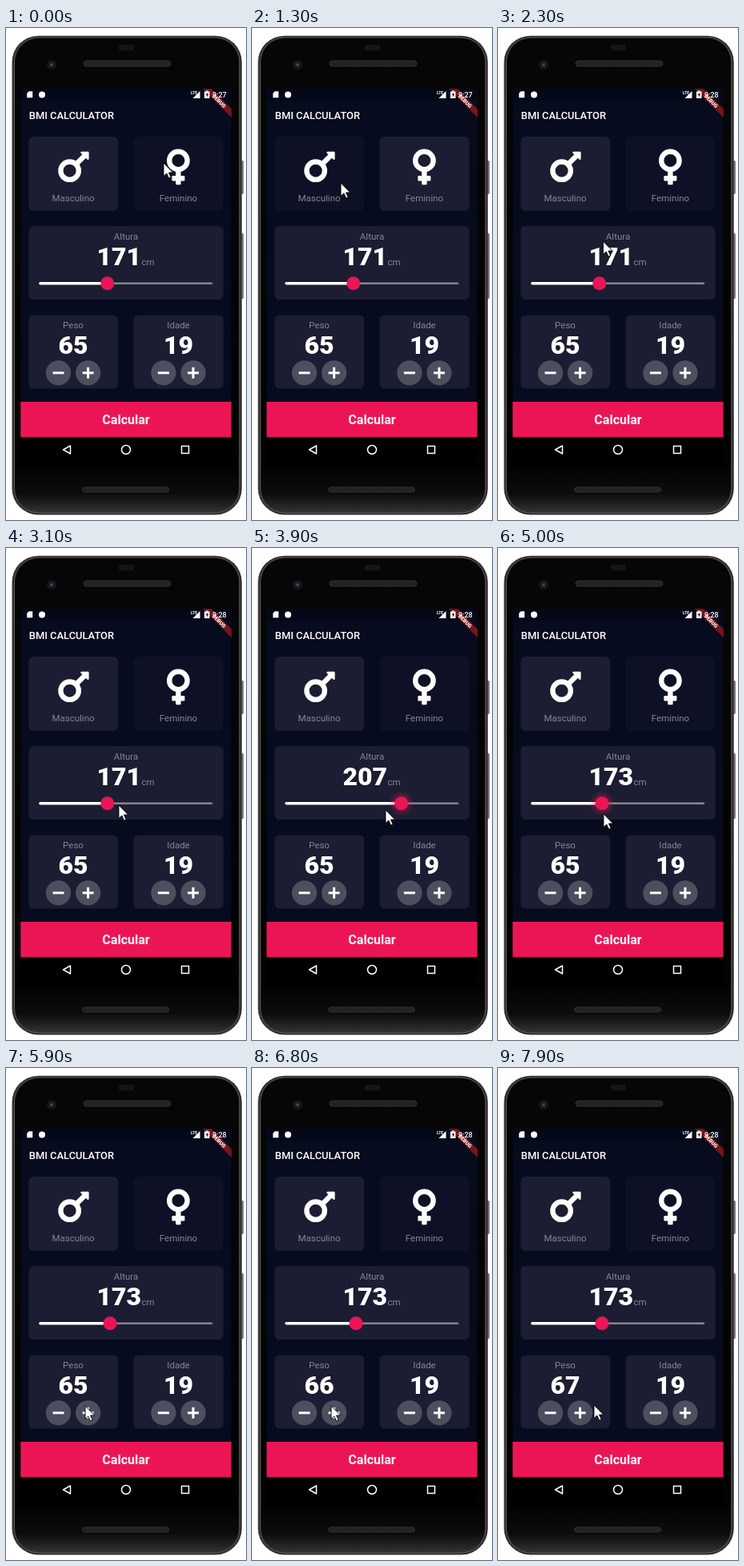
Recreate the animation shown at these times as an HTML page. Size 300 by 616 pixels, loop 8 s.

```html
<!DOCTYPE html>
<html lang="pt">
<head>
<meta charset="utf-8">
<title>BMI Calculator</title>
<style>
  html, body { margin: 0; width: 100%; height: 100%; overflow: hidden; background: #fff; }
  svg { display: block; width: 300px; height: 616px; }
  text { font-family: Roboto, Arial, sans-serif; fill: #fff; }
  .mid { text-anchor: middle; }
  .label { font-size: 11.5px; fill: #85868f; }
  .num { font-size: 32px; font-weight: 900; }
  .card { fill: #1c1d32; }
  .line { fill: none; stroke: #fff; }
</style>
</head>
<body>
<svg viewBox="0 0 300 616">
  <defs>
    <linearGradient id="body" x2="0" y2="1">
      <stop offset=".04" stop-color="#060606"/>
      <stop offset=".9" stop-color="#020202"/>
      <stop offset=".96" stop-color="#0c0c0c"/>
      <stop offset="1" stop-color="#333"/>
    </linearGradient>
    <radialGradient id="glow">
      <stop offset=".55" stop-color="#eb1555" stop-opacity=".34"/>
      <stop offset="1" stop-color="#eb1555" stop-opacity=".06"/>
    </radialGradient>
    <clipPath id="screen"><path d="M18 76H282V545H18z"/></clipPath>
    <g id="minus">
      <circle r="15.6" fill="#4c4f5e"/>
      <path class="line" stroke-width="3" d="M-7 0H7"/>
    </g>
    <g id="plus">
      <use href="#minus"/>
      <path class="line" stroke-width="3" d="M0-7V7"/>
    </g>
  </defs>

  <!-- phone -->
  <path fill="#777" d="M293 166h3q1 0 1 2v38q0 2-1 2h-3zM293 257h3q1 0 1 2v78q0 2-1 2h-3z"/>
  <rect x="7.500" y="9.700" width="287.300" height="599.800" rx="33" fill="#303030"/>
  <rect x="10.500" y="12" width="281.300" height="595" rx="30.500" fill="url(#body)" stroke="#5a5a5a"/>
  <rect x="141" y="21" width="19" height="7" rx="2" fill="#151515"/>
  <circle cx="57" cy="46" r="6" fill="#17171a"/>
  <circle cx="57" cy="46" r="2" fill="#3d4668"/>
  <g fill="#222" stroke="#303030">
    <rect x="97" y="41" width="109" height="7" rx="3.500"/>
    <rect x="95.500" y="575" width="108" height="6" rx="3"/>
  </g>

  <!-- app -->
  <g clip-path="url(#screen)">
    <path fill="#070b1e" d="M18.300 76H281.500V513H18.300z"/>
    <path fill="#050818" d="M18.300 76H281.500V91H18.300z"/>
    <g transform="translate(282 76) rotate(45)">
      <path fill="#b71c1c" fill-opacity=".63" d="M-26 18H26V25.700H-26z"/>
      <text class="mid" y="24.200" font-size="6.500" font-weight="900">DEBUG</text>
    </g>
    <path fill="#fff" d="M28.700 79.300h4.500v8h-7v-5.500z"/>
    <circle cx="45" cy="83.500" r="4" fill="#fff"/>
    <text x="231" y="83" font-size="5" font-weight="700">LTE</text>
    <path fill="#fff" d="M242.500 79v9h-9zM250 78.500h2.500v1h2v8.500h-6.500v-8.500h2z"/>
    <path fill="#050818" d="M251.800 80.500l-2 3.500h1.300v2.500l2-3.500h-1.300z"/>
    <text id="clock" x="258" y="87" font-size="9" font-weight="500">9:27</text>
    <text x="28.800" y="113.700" font-size="12.900" font-weight="500">BMI CALCULATOR</text>

    <rect id="male" class="card" x="28.300" y="136" width="112" height="93" rx="6.400"/>
    <rect id="female" class="card" x="159.300" y="136" width="112.500" height="93" rx="6.400"/>
    <rect class="card" x="28.300" y="248" width="243.500" height="92" rx="6.400"/>
    <rect class="card" x="28.300" y="359.500" width="112" height="92" rx="6.400"/>
    <rect class="card" x="159.300" y="359.500" width="112.500" height="92" rx="6.400"/>

    <g transform="translate(65.200 148.300) scale(.1)">
      <g class="line" stroke-width="64">
        <circle cx="144" cy="304" r="112"/>
        <path d="M230 218L340 108"/>
      </g>
      <path fill="#fff" d="M372 64h-79c-11 0-16 13-8.500 20.400L363 163c8 8 21 2 21-8.500V76q0-12-12-12z"/>
    </g>
    <g transform="translate(201 148.300) scale(.1)">
      <circle class="line" stroke-width="64" cx="144" cy="176" r="112"/>
      <g fill="#fff">
        <rect x="112" y="300" width="64" height="180" rx="12"/>
        <rect x="64" y="368" width="160" height="64" rx="12"/>
      </g>
    </g>
    <g class="mid">
      <text class="label" x="84" y="217">Masculino</text>
      <text class="label" x="215.500" y="217">Feminino</text>
      <text class="label" x="150" y="265">Altura</text>
      <text class="label" x="84" y="375.700">Peso</text>
      <text class="label" x="215.500" y="375.700">Idade</text>
      <text id="weight" class="num" x="84" y="407.500">65</text>
      <text class="num" x="215.500" y="407.500">19</text>
    </g>
    <text id="height" class="num mid" x="141.300" y="296.800">171</text>
    <text class="label" x="169.500" y="297">cm</text>

    <path fill="none" stroke="#85868f" stroke-width="2.600" stroke-linecap="round" d="M42.500 319.700H257"/>
    <path id="track" class="line" stroke-width="3.400" stroke-linecap="round"/>
    <g id="thumb">
      <circle id="halo" r="15" fill="url(#glow)"/>
      <circle r="8.500" fill="#eb1555"/>
    </g>

    <use href="#minus" x="65.500" y="431.800"/>
    <use href="#plus" x="102.600" y="431.800"/>
    <use href="#minus" x="196.900" y="431.800"/>
    <use href="#plus" x="234" y="431.800"/>

    <path fill="#eb1555" d="M18.300 468H281.500V512.500H18.300z"/>
    <text class="mid" x="150" y="496" font-size="16" font-weight="700">Calcular</text>
    <path d="M18 512.500H282V545H18z"/>
    <g class="line" stroke-width="1.500">
      <path d="M80.500 523V533L71.500 528z" stroke-linejoin="round"/>
      <circle cx="150" cy="528" r="5.500"/>
      <path d="M219.500 523.500h9v9h-9z"/>
    </g>
  </g>

  <path id="cursor" fill="#fff" stroke="#000" stroke-width=".9" d="M0 0V16.500L3.800 13l2.700 6 2.700-1.100-2.700-5.900H11.700z"/>
</svg>
<script>
const LOOP = 8000;
const $ = id => document.getElementById(id);
const clamp = (v, lo, hi) => Math.min(hi, Math.max(lo, v));

// Pointer stops: time, x, y
const stops = [
  [0, 197, 169], [600, 197, 169], [1300, 111, 194], [1800, 111, 194],
  [2700, 146, 319], [3100, 141, 322], [3250, 127, 322], [3650, 205, 325],
  [3800, 187, 327], [3900, 167, 328], [4400, 126, 331], [4900, 130, 333],
  [5000, 132, 333], [5250, 131, 333], [5850, 99, 423], [7600, 99, 423],
  [7900, 120, 422], [LOOP, 120, 422]
];

function pointer(t) {
  const i = stops.findIndex(s => s[0] > t);
  const [t0, x0, y0] = stops[i - 1], [t1, x1, y1] = stops[i];
  const k = (t - t0) / (t1 - t0), e = k * k * (3 - 2 * k);
  return [x0 + (x1 - x0) * e, y0 + (y1 - y0) * e];
}

function draw(t) {
  const female = t >= 400 && t < 1600;
  $('male').style.fill = female ? '#0e1126' : '#1c1d32';
  $('female').style.fill = female ? '#1c1d32' : '#0e1126';
  $('clock').textContent = t < 2300 ? '9:27' : '9:28';
  $('weight').textContent = 65 + (t >= 6500) + (t >= 6900);

  // The slider trails the pointer while dragged; its range is 120 to 250 cm.
  const [dragX] = pointer(clamp(t - 100, 3250, 4900));
  const cm = Math.round(120 + (dragX - 42) / 216 * 130);
  const x = 42 + (cm - 120) / 130 * 216;
  $('height').textContent = cm;
  $('track').setAttribute('d', `M43 319.700H${x}`);
  $('thumb').setAttribute('transform', `translate(${x} 319.700)`);
  $('halo').setAttribute('opacity', clamp(Math.min(t - 3250, 5300 - t) / 100, 0, 1));

  $('cursor').setAttribute('transform', `translate(${pointer(t)})`);
}

function frame() {
  draw(performance.now() % LOOP);
  requestAnimationFrame(frame);
}
frame();
</script>
</body>
</html>
```
